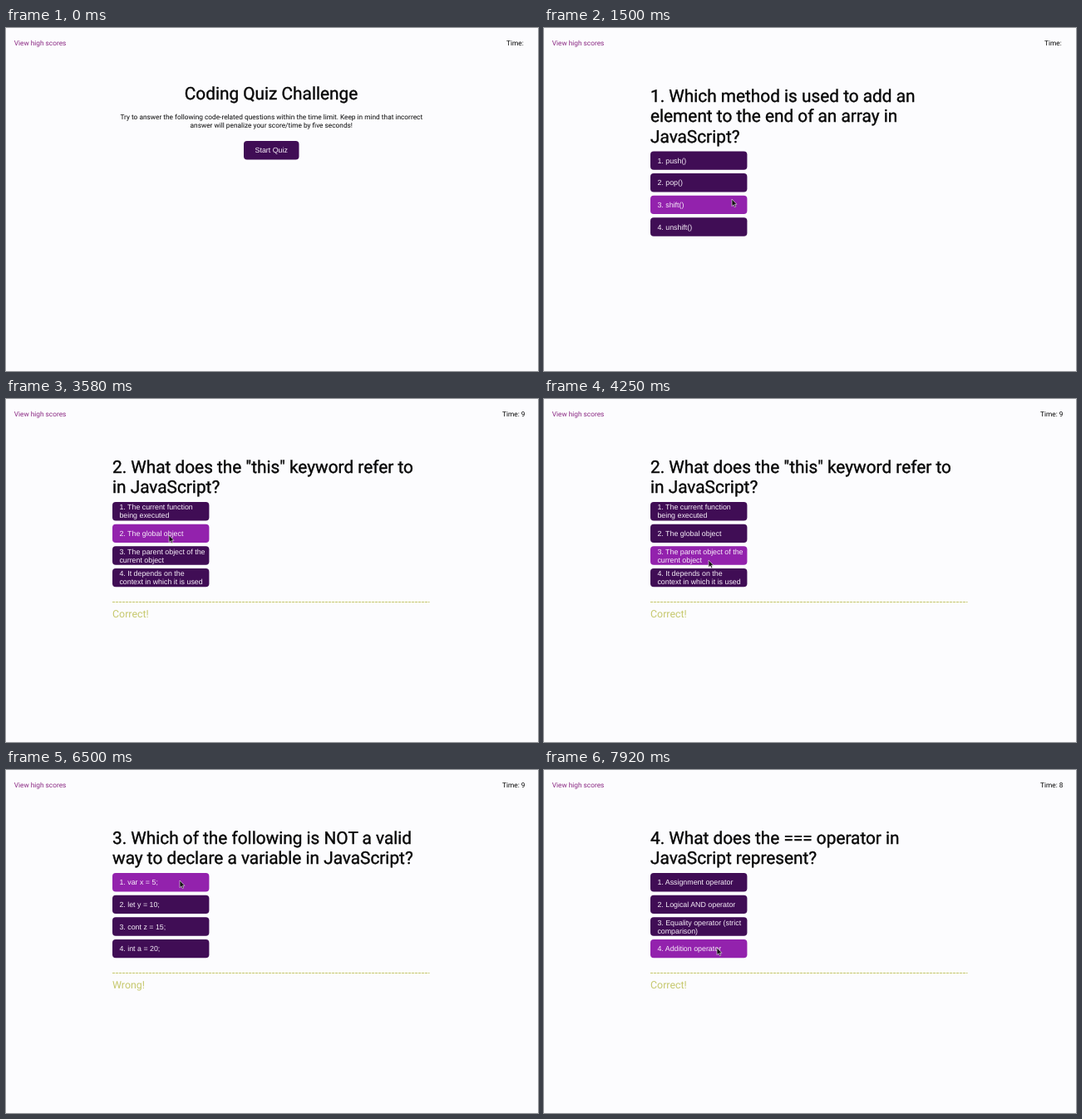
An HTML page for the animation above (8 s loop, 640x413 px).

```html
<!DOCTYPE html>
<html lang="en">
<head>
<meta charset="utf-8">
<title>Coding Quiz</title>
<style>
  html, body { margin: 0; width: 100%; height: 100%; overflow: hidden; background: #fcfcfe; }
  svg { display: block; width: 100vw; height: 100vh; }
  text { font: 8.3px Roboto, sans-serif; fill: #080808; text-rendering: geometricPrecision; white-space: pre; }
  .title { font-size: 20.8px; stroke: #080808; stroke-width: .4px; }
  .mid { text-anchor: middle; }
  .link { fill: #8a2882; }
  .label { font: 8.85px "Liberation Sans", Arial, sans-serif; fill: #f8f0fa; }
  .btn { fill: #400d55; }
  .btn.hover { fill: #9322ad; }
  .note { font-size: 12.4px; fill: #c6c86c; }
  .rule { stroke: #c6c86c; stroke-dasharray: 3.2 .8; }
</style>
</head>
<body>
<svg id="stage" viewBox="0 0 640 413"></svg>
<script>
const LOOP = 8000, STEP = 250 / 3, PITCH = 26.6;
const stage = document.getElementById('stage');

function add(parent, tag, attrs, text) {
  const el = document.createElementNS('http://www.w3.org/2000/svg', tag);
  for (const k in attrs) el.setAttribute(k, attrs[k]);
  if (text) el.textContent = text;
  return parent.appendChild(el);
}
const write = (parent, x, y, cls, text) => add(parent, 'text', { x, y, class: cls }, text);
const button = (parent, x, y, width) =>
  add(parent, 'rect', { x, y, width, height: 22.4, rx: 4, class: 'btn' });
const show = (el, on) => el.setAttribute('visibility', on ? 'visible' : 'hidden');

const questions = [
  { from: 920, title: ['1. Which method is used to add an', 'element to the end of an array in', 'JavaScript?'],
    options: ['1. push()', '2. pop()', '3. shift()', '4. unshift()'] },
  { from: 3330, title: ['2. What does the "this" keyword refer to', 'in JavaScript?'],
    options: ['1. The current function|being executed', '2. The global object',
      '3. The parent object of the|current object', '4. It depends on the|context in which it is used'] },
  { from: 5580, title: ['3. Which of the following is NOT a valid', 'way to declare a variable in JavaScript?'],
    options: ['1. var x = 5;', '2. let y = 10;', '3. cont z = 15;', '4. int a = 20;'] },
  { from: 7670, title: ['4. What does the === operator in', 'JavaScript represent?'],
    options: ['1. Assignment operator', '2. Logical AND operator',
      '3. Equality operator (strict|comparison)', '4. Addition operator'] }
];

// Header
write(stage, 9.7, 21.3, 'link', 'View high scores');
const timer = write(stage, 602, 21.3, '', 'Time:');

// Start page
const intro = add(stage, 'g', {});
write(intro, 319, 86, 'title mid', 'Coding Quiz Challenge');
write(intro, 319.3, 109.8, 'mid',
  'Try to answer the following code-related questions within the time limit. Keep in mind that incorrect');
write(intro, 319.3, 119.9, 'mid', 'answer will penalize your score/time by five seconds!');
const start = button(intro, 286, 136, 66.5);
write(intro, 319.2, 150.2, 'label mid', 'Start Quiz');

// Question pages
for (const q of questions) {
  q.page = add(stage, 'g', {});
  q.title.forEach((line, i) => write(q.page, 128, 89 + i * 24.35, 'title', line));
  q.top = 75.4 + q.title.length * 24.35;
  q.buttons = q.options.map((option, i) => {
    const y = q.top + i * PITCH, lines = option.split('|');
    const rect = button(q.page, 128, y, 116.4);
    const base = y + (lines.length > 1 ? 9.3 : 14.3);
    lines.forEach((line, j) => write(q.page, 136.4, base + j * 10, 'label', line));
    return rect;
  });
}

// Answer feedback
const feedback = add(stage, 'g', {});
add(feedback, 'line', { x1: 128, x2: 509.5, y1: 244.5, y2: 244.5, class: 'rule' });
const note = write(feedback, 128, 262.6, 'note', 'Correct!');
const notes = [[3330, 4340, 'Correct!'], [5580, 6600, 'Wrong!'], [7670, LOOP, 'Correct!']];

const ticks = [[0, 602, 'Time:'], [1920, 592, 'Time: 10'], [2920, 597, 'Time: 9'], [7900, 597, 'Time: 8']];

const cursor = add(stage, 'path', {
  d: 'M0 0V8.6L2 6.8 3.3 9.7 4.7 9.1 3.5 6.3H6Z',
  fill: '#141014', stroke: '#eee', 'stroke-width': .6
});
// Pointer path: time, x, y
const path = [
  [0, 350, 430], [80, 350, 412], [750, 318, 152], [920, 318, 150], [1500, 226, 206], [1670, 226, 206],
  [1950, 214, 218], [2420, 200, 202], [2670, 196, 164], [3750, 196, 164], [4250, 198, 194],
  [4500, 197, 194], [4750, 193, 200], [4920, 193, 200], [5080, 193, 212], [5250, 193, 212],
  [5420, 196, 198], [5750, 196, 198], [5920, 196, 205], [6080, 198, 210], [6500, 209, 133],
  [6750, 209, 133], [6900, 208, 165], [7080, 208, 136], [7170, 208, 136], [7330, 208, 214], [LOOP, 208, 214]
];

function pointer(t) {
  const i = path.findIndex(k => k[0] > t);
  const [t0, x0, y0] = path[i - 1], [t1, x1, y1] = path[i];
  const u = (t - t0) / (t1 - t0), e = u * u * (3 - 2 * u);
  return [x0 + (x1 - x0) * e, y0 + (y1 - y0) * e];
}

function render(now) {
  const n = Math.floor((now % LOOP + 4) / STEP);
  const t = Math.min(Math.round(n * STEP / 10) * 10, LOOP - 1);
  const [x, y] = pointer(t);
  cursor.setAttribute('transform', `translate(${x} ${y})`);
  show(cursor, t >= 80);

  const current = questions.filter(q => t >= q.from).pop();
  show(intro, !current);
  start.classList.toggle('hover', Math.abs(x - 319) < 33 && Math.abs(y - 147) < 11);
  for (const q of questions) show(q.page, q === current);
  if (current) {
    const over = x > 128 && x < 244 ? Math.floor((y - 2 - current.top) / PITCH) : -1;
    current.buttons.forEach((b, i) => b.classList.toggle('hover', i === over));
  }

  const msg = notes.find(([from, to]) => t >= from && t < to);
  show(feedback, msg);
  if (msg) note.textContent = msg[2];

  const [, tx, label] = ticks.filter(k => t >= k[0]).pop();
  timer.setAttribute('x', tx);
  timer.textContent = label;
}

const began = performance.now();
function frame() {
  render(performance.now() - began);
  requestAnimationFrame(frame);
}
frame();
</script>
</body>
</html>
```
